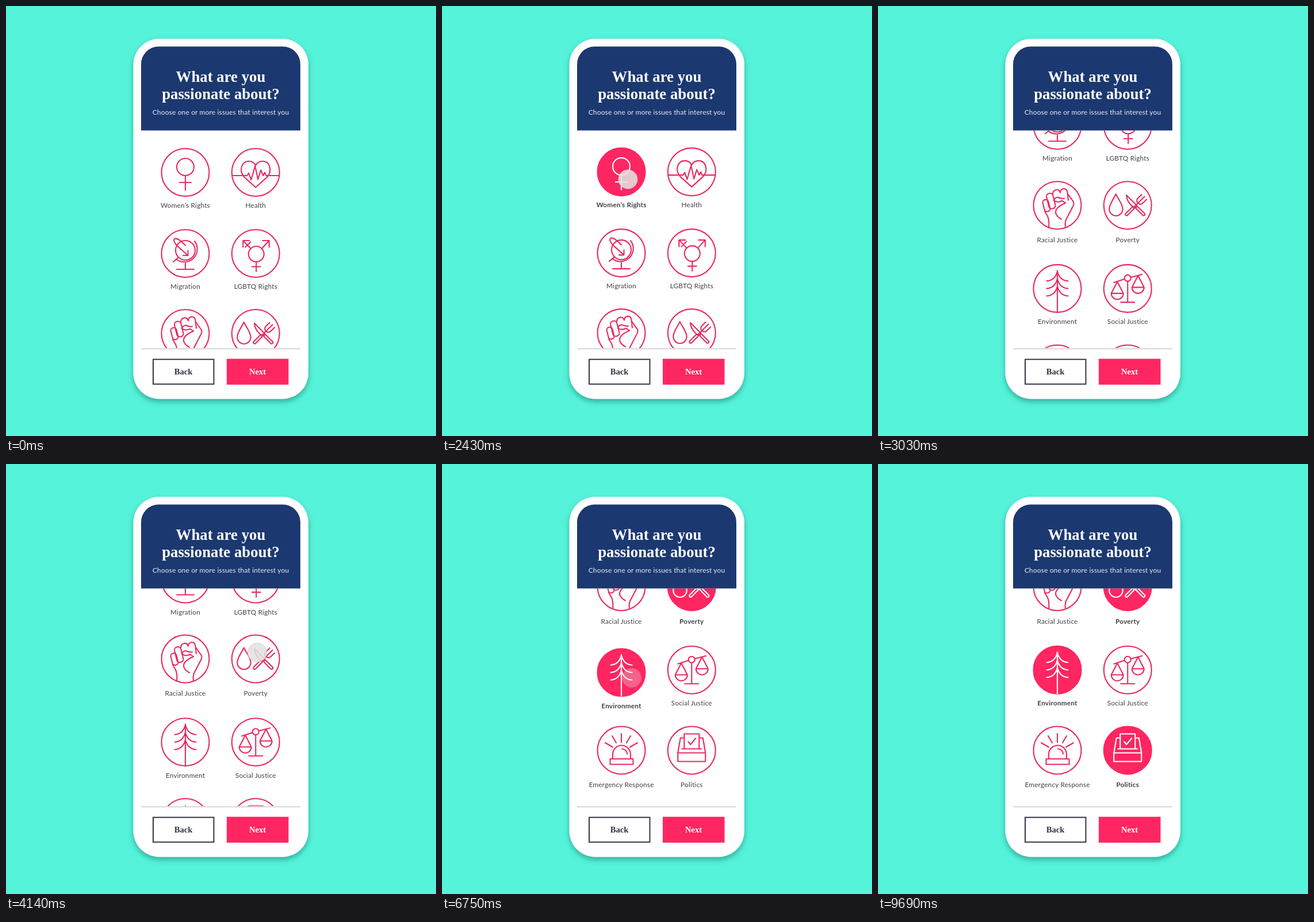
An HTML page for the animation above (9720 ms loop, 748x748 px).

```html
<!DOCTYPE html>
<html lang="en">
<head>
<meta charset="utf-8">
<title>What are you passionate about?</title>
<style>
  html, body { margin: 0; width: 100%; height: 100%; overflow: hidden; background: #55f3da; }
  svg { display: block; width: 100vw; height: 100vh; }
  text { text-anchor: middle; }
  .serif { font-family: "Liberation Serif", serif; font-weight: 700; }
  .sans { font-family: Lato, sans-serif; font-size: 12px; letter-spacing: .15px; }
  .label { font-family: Lato, sans-serif; font-size: 11.8px; letter-spacing: .2px; fill: #40414a; }
  .icon { fill: none; stroke: currentColor; stroke-width: 2.1; stroke-linecap: round; stroke-linejoin: round; }
</style>
</head>
<body>
<svg viewBox="0 0 748 748">
  <defs>
    <filter id="shadow" x="-20%" y="-10%" width="140%" height="125%">
      <feDropShadow dx="0" dy="5" stdDeviation="5" flood-color="#07685c" flood-opacity=".5"/>
    </filter>
    <clipPath id="listArea"><rect x="235" y="216.5" width="277" height="380"/></clipPath>
  </defs>
  <rect width="748" height="748" fill="#55f3da"/>
  <rect x="221.5" y="57" width="304.5" height="626.5" rx="45" fill="#fff" filter="url(#shadow)"/>

  <g clip-path="url(#listArea)"><g id="list"></g></g>

  <path d="M235 216.5V101A30.5 30.5 0 0 1 265.500 70.500H481.500A30.500 30.500 0 0 1 512 101V216.500Z" fill="#1c3870"/>
  <g fill="#fff">
    <text class="serif" x="373.5" y="131.500" font-size="26.800">What are you</text>
    <text class="serif" x="373.5" y="161.500" font-size="26.800">passionate about?</text>
    <text class="sans" x="373.5" y="189" fill="#e9edf6">Choose one or more issues that interest you</text>
  </g>

  <rect x="235" y="595" width="277" height="2.500" fill="#dedee1"/>
  <rect x="256" y="614.700" width="105.500" height="43" fill="#fff" stroke="#343846" stroke-width="2"/>
  <rect x="384" y="613.700" width="107.500" height="45" fill="#ff2661"/>
  <text class="serif" x="308.500" y="640.500" font-size="14.600" fill="#30323d">Back</text>
  <text class="serif" x="437.500" y="640.500" font-size="14.600" fill="#fff">Next</text>

  <circle id="touch" r="16.500" fill="#e3e3e2" stroke="#cfcfcf"/>
</svg>

<script>
const LOOP = 9720;
const line = d => `<path d="${d}"/>`;
const ring = (x, y, r) => `<circle cx="${x}" cy="${y}" r="${r}"/>`;
const box = (x, y, w, h, r = 0, turn = 0) =>
  `<rect x="${x}" y="${y}" width="${w}" height="${h}" rx="${r}" transform="rotate(${turn} ${x + w / 2} ${y + h / 2})"/>`;
const mirror = shape => shape + `<g transform="scale(-1 1)">${shape}</g>`;

// Icons are drawn around the centre of their round badge.
const icons = {
  womens: ring(0, -9.5, 15) + line('M0 5.5V31M-10 17.5H10'),

  health: line('M0 26L-20 8C-30 -4-24 -19.5-12 -19.5C-6 -19.5-2 -16 0 -12C2 -16 6 -19.5 12 -19.5C24 -19.5 30 -4 20 8Z')
    + line('M-41 5.5H-15L-12 1L-8 13L-1 -11L4 12L9 -4L13 5.5L16 0L18 5.5H41'),

  migration: ring(0, -5.5, 17)
    + line('M16 -21.5A22.5 22.5 0 0 1 -15 10.5M-13 7.5L-21 14.5M0 17V27.5M-15 27.5H15')
    + line('M-14 -13C-19 -18-22 -24-18 -26C-12 -27-5 -19 0 -14M-14 -13L4 3M-4 3.5H4.5V-5'),

  lgbtq: ring(1, 1, 13.5)
    + line('M1 14.5V31.5M-6.5 23H8.5M10.5 -8.5L23.5 -22.5M12 -22.5H23.5V-11')
    + line('M-8.5 -8.5L-22 -22.5M-22 -11V-22.5H-11M-18 -11L-9 -20'),

  fist: box(-24, -10, 10, 21, 4.5, -14) + box(-17, -21, 11.5, 27, 5, -14)
    + line('M-8 -19Q-8 -26-2 -27Q3 -28 5 -22M5 -22Q5 -28 11 -29Q17 -29 17.5 -22L19 -9')
    + line('M-6 -8Q-5 -14 1 -14Q7 -11 12 -12M-6 -8Q2 -4 8 -8L14 -4')
    + line('M-22 10C-20 16-13 18-15 39M18 -20L28 -6Q29 -3 28 0L15 25Q13 30 14 38M14 -4Q-7 5-2 16Q1 21 7 24'),

  poverty: line('M-20.5 -19.5C-25 -10-32 -2-32 6.5A11.7 11.7 0 0 0-8.6 6.5C-8.6 -2-16 -10-20.5 -19.5Z')
    + `<g transform="translate(13 1) rotate(45)">${box(-2.2, 3, 4.4, 20, 2)}${
      line('M-6 -22V-13Q-6 -7 0 -7Q6 -7 6 -13V-22M0 -23V3')}</g>`
    + `<g transform="translate(13 1) rotate(-45)">${box(-2.2, 3, 4.4, 20, 2)}${
      line('M2.5 2H-4V-6Q-4 -17 2.5 -24Z')}</g>`,

  environment: line('M0 -31V41')
    + mirror(line('M0 -30Q-4 -14-18.5 -13M0 -17Q-4 -1-18.5 0M0 -4Q-4 12-18.5 13')),

  justice: ring(0, -18, 5.5)
    + line('M-24 -10.5L-5.5 -16.5M5.5 -19.5L25 -24.5M0 -12.5V24M-12 24H12')
    + ['-18 -12', '18 -22.5'].map(at => `<g transform="translate(${at})">${
      line('M0 0L-10.5 20.5H10.5ZM-10.5 20.5A10.5 10.5 0 0 0 10.5 20.5')}</g>`).join(''),

  emergency: box(-19.5, 15, 40, 9.5) + line('M-15 15V7A15.5 15.5 0 0 1 16 7V15M1 -2.5A9 9 0 0 1 10 6.5M0 -29V-14')
    + mirror(line('M-16 -25L-9 -13M-28 -13L-15 -5.5')),

  politics: line('M-13 -3V-28.5H13V-3M-17 -2.5H17M-6 -15L-2 -10L7 -21') + box(-24, 4.5, 48, 15)
    + mirror(line('M-13 -21.5H-19.5L-24 4.5')),
};

// [icon, label, time of selection]
const rows = [
  { y: 289.5, label: 61.5, items: [['womens', 'Women’s Rights', 2050], ['health', 'Health']] },
  { y: 430.5, label: 61.5, items: [['migration', 'Migration'], ['lgbtq', 'LGBTQ Rights']] },
  { y: 569.5, label: 64, items: [['fist', 'Racial Justice'], ['poverty', 'Poverty', 4480]] },
  { y: 714.2, label: 62, items: [['environment', 'Environment', 6600], ['justice', 'Social Justice']] },
  { y: 854, label: 64, items: [['emergency', 'Emergency Response'], ['politics', 'Politics', 8420]] },
];

const touches = [
  { x: 323.5, y: 301.5, from: 1560, to: 2430 },
  { x: 437, y: 328, from: 3930, to: 5010 },
  { x: 330, y: 372, from: 6100, to: 6560 },
  { x: 446, y: 508, from: 7990, to: 8400 },
];

const scrolls = [
  { from: 2430, time: 1050, distance: 230.5 },
  { from: 4960, time: 444, distance: 125.5 },
];

const list = document.getElementById('list');
const touchDot = document.getElementById('touch');
const items = [];
for (const row of rows) {
  row.items.forEach(([icon, label, selectAt = Infinity], column) => {
    const group = document.createElementNS('http://www.w3.org/2000/svg', 'g');
    group.innerHTML = `<circle r="41.5"/><g class="icon">${icons[icon]}</g>
      <text class="label" y="${row.label}">${label}</text>`;
    list.append(group);
    const [badge, drawing, text] = group.children;
    items.push({ group, badge, drawing, text, selectAt, x: column ? 434.3 : 312, y: row.y });
  });
}

const progress = (t, from, time) => Math.min(1, Math.max(0, (t - from) / time));
const mix = (a, b, p) => `rgb(${a.map((v, i) => v + (b[i] - v) * p)})`;
const LINE = [232, 42, 96], PINK = [255, 38, 97], WHITE = [255, 255, 255];

function draw(t) {
  const scroll = scrolls.reduce((sum, s) =>
    sum + s.distance * (1 - (1 - progress(t, s.from, s.time)) ** 4), 0);
  list.setAttribute('transform', `translate(0 ${-scroll})`);

  for (const item of items) {
    const selected = progress(t, item.selectAt, 120);
    const dip = 4.5 * Math.sin(Math.PI * progress(t, item.selectAt, 300));
    item.group.setAttribute('transform', `translate(${item.x} ${item.y + dip})`);
    item.badge.setAttribute('fill', mix(WHITE, PINK, selected));
    item.badge.setAttribute('stroke', mix(LINE, PINK, selected));
    item.badge.setAttribute('stroke-width', 2.1);
    item.drawing.style.color = mix(LINE, WHITE, selected);
    item.text.style.fontWeight = selected > 0 ? 700 : 400;
  }

  const touch = touches.find(p => t >= p.from && t < p.to + 300);
  touchDot.setAttribute('opacity', touch
    ? 0.86 * progress(t, touch.from, 150) * (1 - progress(t, touch.to, 300)) : 0);
  if (touch) touchDot.setAttribute('transform', `translate(${touch.x} ${touch.y})`);
}

const start = performance.now();
function tick() {
  draw((performance.now() - start) % LOOP);
  requestAnimationFrame(tick);
}
tick();
</script>
</body>
</html>
```
